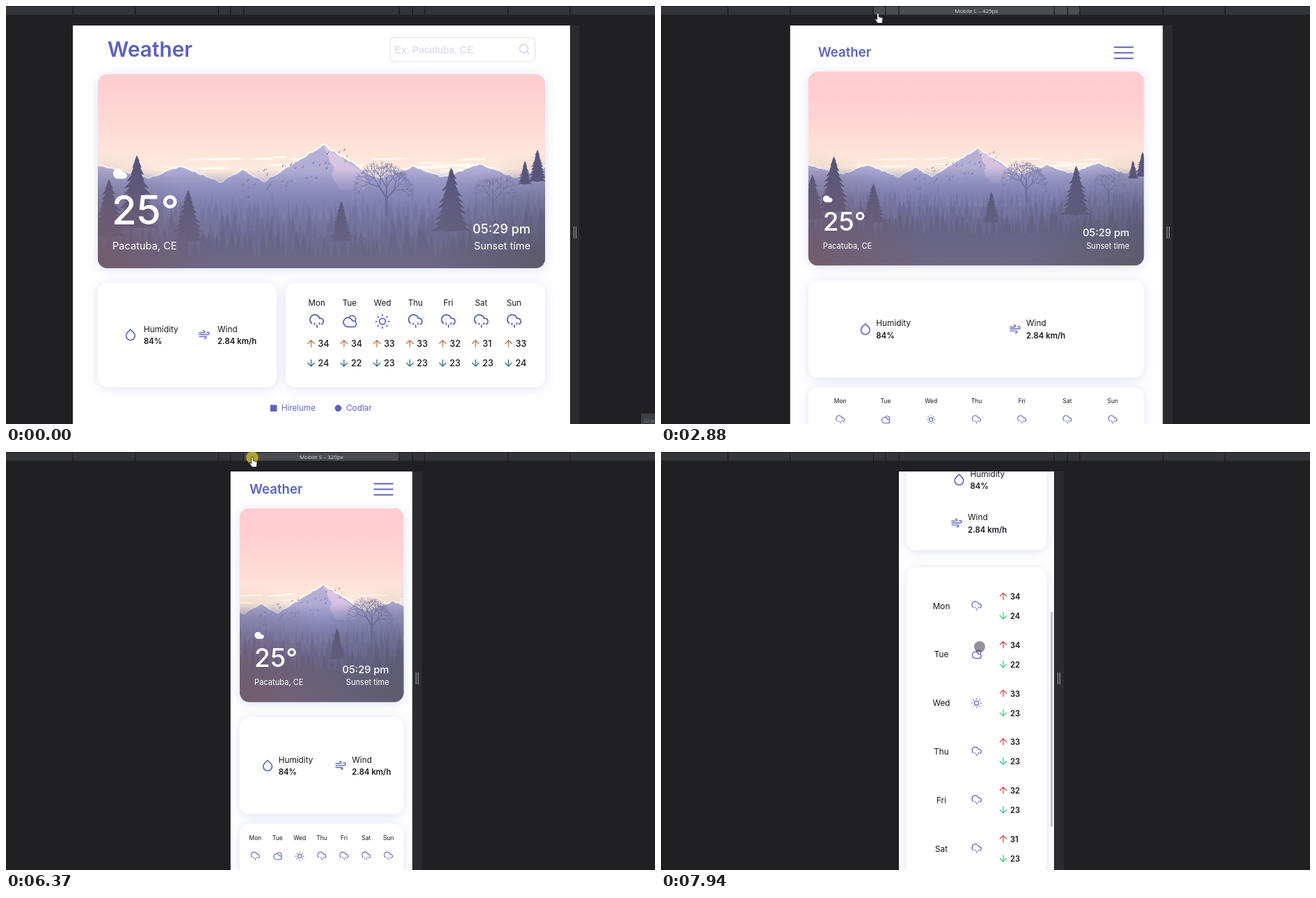
Write an HTML page with a canvas that moves like this. It is 933 px wide and 601 px high and loops after 8000 ms.

```html
<!DOCTYPE html>
<html lang="en">
<head>
<meta charset="utf-8">
<title>Weather layouts</title>
<style>
html, body { margin: 0; width: 100%; height: 100%; overflow: hidden; background: #202022; }
canvas { display: block; }
</style>
</head>
<body>
<canvas id="stage" width="933" height="601"></canvas>
<script>
const ctx = document.getElementById('stage').getContext('2d');
const LOOP = 8000, ZOOM = 0.698, MID = 453.5, TOP = 28;
const ACCENT = '#5c62be', INK = '#17171f', RED = '#d9534f', GREEN = '#4fc98a';
const DAYS = 'Mon Tue Wed Thu Fri Sat Sun'.split(' ');
const HIGHS = '34 34 33 33 32 31 33'.split(' ');
const LOWS = '24 22 23 23 23 23 24'.split(' ');
const skyIcon = i => ['rain', 'cloudSun', 'sun'][i] || 'rain';

const PATHS = {
  rain: 'M20 16.6A5 5 0 0 0 18 7h-1.26A8 8 0 1 0 4 15.25M8.5 15v2M12.5 18v3.5M16.5 14.5v2',
  cloudSun: 'M18 11h-1.26A7.6 7.6 0 1 0 9.5 21H18a5 5 0 0 0 0-10zM11.5 5.5A5.3 5.3 0 1 1 21.5 10.8',
  sun: 'M17 12a5 5 0 1 1-10 0 5 5 0 0 1 10 0',
  cloud: 'M18 10h-1.26A8 8 0 1 0 9 20h9a5 5 0 0 0 0-10z',
  drop: 'M12 2.7l5.66 5.66a8 8 0 1 1-11.32 0z',
  wind: 'M9.6 4.6A2 2 0 1 1 11 8H2m10.6 11.4A2 2 0 1 0 14 16H2m15.7-8.3A2.5 2.5 0 1 1 19.5 12H2',
  up: 'M12 19V5M5 12l7-7 7 7',
  down: 'M12 5v14M5 12l7 7 7-7',
  search: 'M19 11a8 8 0 1 1-16 0 8 8 0 0 1 16 0M21 21l-4.35-4.35',
  hand: 'M-1.3 1.2a1.3 1.3 0 0 1 2.6 0V5.6l4.4 1q1.5.4 1.3 2L6.3 14.8H-.2L-3.9 9.8q-.6-1.7 1-1.4l1.6 1.2z',
  arrow: 'M0 0V12L2.8 9.4 4.6 13.4 6.3 12.6 4.5 8.8H8.2z'
};
for (const key in PATHS) PATHS[key] = new Path2D(PATHS[key]);
for (let i = 0; i < 8; i++) {
  const c = Math.cos(i * Math.PI / 4), s = Math.sin(i * Math.PI / 4);
  PATHS.sun.moveTo(12 + 9.4 * c, 12 + 9.4 * s);
  PATHS.sun.lineTo(12 + 11 * c, 12 + 11 * s);
}

const clamp = v => Math.max(0, Math.min(1, v));
const easeOut = p => 1 - (1 - p) ** 2;

function text(str, x, y, size, color = INK, weight = 400, align = 'left', family = 'Inter') {
  ctx.font = `${weight} ${size}px "${family}", sans-serif`;
  ctx.fillStyle = color;
  ctx.textAlign = align;
  ctx.fillText(str, x, y);
}

function icon(name, cx, cy, size, color = ACCENT, fill = false) {
  ctx.save();
  ctx.translate(cx, cy);
  ctx.scale(size / 24, size / 24);
  ctx.translate(-12, -12);
  ctx.lineWidth = 2;
  ctx.lineCap = ctx.lineJoin = 'round';
  ctx.strokeStyle = ctx.fillStyle = color;
  fill ? ctx.fill(PATHS[name]) : ctx.stroke(PATHS[name]);
  ctx.restore();
}

function roundRect(x, y, w, h, r) {
  ctx.beginPath();
  ctx.roundRect(x, y, w, h, r);
}

function disc(x, y, r, color) {
  ctx.fillStyle = color;
  ctx.beginPath();
  ctx.arc(x, y, r, 0, 7);
  ctx.fill();
}

function card(x, y, w, h) {
  ctx.save();
  ctx.shadowColor = 'rgba(92,98,200,.2)';
  ctx.shadowBlur = 16;
  ctx.shadowOffsetY = 2;
  ctx.fillStyle = '#fff';
  roundRect(x, y, w, h, 14);
  ctx.fill();
  ctx.restore();
}

// Landscape, painted once
const SCENE_W = 643, SCENE_H = 362;
const scene = paintScene();

function paintScene() {
  const cv = document.createElement('canvas');
  cv.width = SCENE_W * 2;
  cv.height = SCENE_H * 2;
  const g = cv.getContext('2d');
  g.scale(2, 2);
  let seed = 11;
  const rand = (a = 0, b = 1) => a + (b - a) * ((seed = (seed * 16807) % 2147483647) / 2147483647);

  const fade = (y0, y1, ...colors) => {
    const grad = g.createLinearGradient(0, y0, 0, y1);
    colors.forEach((c, i) => grad.addColorStop(i / (colors.length - 1), c));
    return grad;
  };
  const band = (y0, y1, ...colors) => {
    g.fillStyle = fade(y0, y1, ...colors);
    g.fillRect(0, y0, SCENE_W, SCENE_H);
  };
  const pine = (x, y, h, w, color) => {
    const tiers = 11;
    g.fillStyle = color;
    for (const side of [-1, 1]) {
      g.beginPath();
      g.moveTo(x, y);
      for (let i = 1; i <= tiers; i++) {
        const reach = side * w / 2 * (i / tiers) ** 0.85, ty = y + h * i / tiers;
        g.lineTo(x + reach * rand(0.8, 1.15), ty);
        g.lineTo(x + reach * 0.6, ty - h * 0.02);
      }
      g.lineTo(x, y + h);
      g.fill();
    }
  };
  const forest = (base, low, high, color) => {
    for (let x = -8; x < SCENE_W + 8; x += rand(3, 11)) {
      const h = rand(low, high) * (0.8 + 0.4 * Math.abs(x / SCENE_W - 0.5));
      pine(x, base - h, h + 8, h * 0.5, color);
    }
    band(base, base + 1, color, color);
  };
  const branch = (x, y, len, angle, width, depth) => {
    const nx = x + Math.cos(angle) * len, ny = y + Math.sin(angle) * len;
    g.lineWidth = width;
    g.beginPath();
    g.moveTo(x, y);
    g.lineTo(nx, ny);
    g.stroke();
    if (!depth) return;
    for (const turn of [-0.62, 0, 0.62]) {
      branch(nx, ny, len * rand(0.62, 0.82), angle + turn * rand(0.8, 1.4), Math.max(0.4, width * 0.55), depth - 1);
    }
  };

  band(0, 205, '#fecdd1', '#fecfd1', '#fed8d3', '#fee5d9', '#fff0e2');

  // thin clouds, denser near the horizon
  g.fillStyle = '#fffaf2';
  for (let i = 0; i < 34; i++) {
    const x = rand(110, 540), y = 184 - 28 * rand() ** 1.4, r = rand(10, 30);
    g.beginPath();
    g.ellipse(x, y, r, rand(0.8, 2), -0.02, 0, 7);
    g.fill();
  }

  // each peak: x, y, slope
  const peaks = [[-12, 170, 0.25], [118, 174, 0.4], [208, 179, 0.6], [324, 144, 0.62], [453, 175, 0.35], [548, 171, 0.38], [655, 170, 0.38]];
  const height = x => Math.min(...peaks.map(([px, py, k]) => py + k * Math.abs(x - px)));
  g.beginPath();
  for (let x = -4; x <= SCENE_W + 4; x += 4) g.lineTo(x, height(x) + rand(-1, 1.5));
  g.strokeStyle = '#fffaf2';
  g.lineWidth = 5;
  g.lineJoin = 'round';
  g.stroke();
  g.lineTo(SCENE_W + 4, SCENE_H);
  g.lineTo(-4, SCENE_H);
  g.fillStyle = fade(144, 235, '#bbb2d7', '#aeabd4', '#989dcb');
  g.fill();

  // lit side of the main peak
  g.beginPath();
  g.moveTo(324, 145);
  g.lineTo(384, 184);
  g.lineTo(384, 208);
  for (let y = 208; y > 150; y -= 8) g.lineTo(326 + (y - 145) * 0.3 + rand(-5, 5), y);
  g.fillStyle = fade(145, 208, '#e0cbe4', '#cbbade');
  g.fill();

  band(178, 232, 'rgba(134,139,192,0)', 'rgba(134,139,192,.6)', '#8488be');

  g.fillStyle = '#6f6a9c';
  for (let i = 0; i < 40; i++) {
    const p = rand(), s = rand(1.5, 3.2);
    const x = 205 + 155 * p, y = 205 - 42 * p + rand(-20, 20);
    g.beginPath();
    g.moveTo(x - s, y - s * 0.4);
    g.lineTo(x, y + s * 0.5);
    g.lineTo(x + s, y - s);
    g.lineTo(x + s * 0.3, y + s);
    g.fill();
  }

  forest(232, 8, 24, '#8085bb');
  forest(252, 12, 32, '#7479ae');
  g.strokeStyle = '#706d9f';
  branch(415, 245, 25, -1.57, 4, 5);
  branch(568, 245, 20, -1.57, 2, 4);
  forest(276, 14, 42, '#666a9e');
  for (const [x, y, h] of [[350, 224, 58], [130, 208, 74], [16, 192, 84], [56, 158, 105], [508, 176, 92], [632, 150, 46], [614, 166, 34]]) {
    pine(x, y, h, h * 0.62, '#57557c');
  }
  forest(302, 18, 46, '#595c85');
  return cv;
}

function landscape(x, y, w, h) {
  card(x, y, w, h);
  ctx.save();
  roundRect(x, y, w, h, 14);
  ctx.clip();
  const s = Math.max(w / SCENE_W, h / SCENE_H);
  ctx.drawImage(scene, x + (w - SCENE_W * s) / 2, y + (h - SCENE_H * s) / 2, SCENE_W * s, SCENE_H * s);
  const wash = (grad, rgb, alpha) => {
    grad.addColorStop(0, `rgba(${rgb},${alpha})`);
    grad.addColorStop(1, `rgba(${rgb},0)`);
    ctx.fillStyle = grad;
    ctx.fillRect(x, y, w, h);
  };
  const corner = cx => ctx.createRadialGradient(cx, y + h, 0, cx, y + h, h * 0.6);
  wash(ctx.createLinearGradient(0, y + h, 0, y + h * 0.5), '116,108,132', 0.75);
  wash(corner(x), '118,86,92', 0.6);
  wash(corner(x + w), '84,82,94', 0.6);
  ctx.restore();
}

function fact(name, label, value, x, y, textX) {
  icon(name, x, y, name === 'drop' ? 19 : 17);
  text(label, textX, y - 4, 11.8);
  text(value, textX, y + 13.5, 11.4, INK, 600);
}
const humidity = (x, y, gap) => fact('drop', 'Humidity', '84%', x, y, x + gap);
const wind = (x, y, gap) => fact('wind', 'Wind', '2.84 km/h', x, y, x + gap);

function temps(i, x, y, upColor, downColor, weight, size) {
  icon('up', x, y, 16, upColor);
  text(HIGHS[i], x + 10, y + 4.7, size, INK, weight);
  icon('down', x, y + 28, 16, downColor);
  text(LOWS[i], x + 10, y + 32.7, size, INK, weight);
}

function menu(right, y, w) {
  ctx.fillStyle = ACCENT;
  for (const dy of [-8, 0, 8]) ctx.fillRect(right - w, y + dy - 1, w, 2);
}

function desktop() {
  text('Weather', 50, 73, 29.8, ACCENT, 600);
  ctx.strokeStyle = '#dfe0f5';
  ctx.lineWidth = 1.2;
  roundRect(456.5, 45.5, 208, 34.5, 6);
  ctx.stroke();
  text('Ex: Pacatuba, CE', 463, 68, 14.4, '#d4d5e9', 400, 'left', 'Liberation Sans');
  icon('search', 649, 62, 18, '#d0d1ed');

  landscape(36, 98, 643, 279);
  icon('cloud', 68, 241, 22, '#fff', true);
  text('25°', 56, 314, 58, '#fff', 500);
  text('Pacatuba, CE', 57, 350, 14.6, '#fff');
  text('05:29 pm', 658, 327, 18.2, '#fff', 500, 'right');
  text('Sunset time', 658, 350, 14.6, '#fff', 400, 'right');

  card(36, 398, 257, 150);
  humidity(83, 472.5, 19);
  wind(189, 472.5, 19);
  card(306, 398, 373, 150);
  DAYS.forEach((day, i) => {
    const x = 350.6 + i * 47.3;
    text(day, x, 431.3, 11.6, INK, 400, 'center');
    icon(skyIcon(i), x, 453.5, 21);
    temps(i, x - 8, 485.3, '#c8744d', '#3c7281', 500, 12.6);
  });
  ctx.fillStyle = ACCENT;
  ctx.fillRect(284, 573.5, 9.5, 9.5);
  text('Hirelume', 300, 582, 11.6, ACCENT);
  disc(381.5, 578.3, 4.8, ACCENT);
  text('Codlar', 393, 582, 11.8, ACCENT);
}

function stacked(w) {
  const m = w * 0.05, cw = w - 2 * m, top = 67.5 + m, right = m + cw;
  text('Weather', m + 14, top - 21, 18.6, ACCENT, 600);
  menu(w - m - 15, top - 27, 28);

  landscape(m, top, cw, 279);
  icon('cloud', m + 28, top + 183, 14.5, '#fff', true);
  text('25°', m + 21, top + 228.5, 37, '#fff', 500);
  text('Pacatuba, CE', m + 21, top + 254.5, 11.1, '#fff');
  text('05:29 pm', right - 21, top + 237, 14.7, '#fff', 500, 'right');
  text('Sunset time', right - 21, top + 254.5, 11.1, '#fff', 400, 'right');

  card(m, top + 300.5, cw, 139.5);
  humidity(m + cw * 0.17, top + 370, 15.5);
  wind(m + cw * 0.616, top + 370, 16);
  card(m, top + 454, cw, 160);
  DAYS.forEach((day, i) => {
    const x = m + cw * (0.095 + i * 0.1353);
    text(day, x, top + 477, 8.5, INK, 400, 'center');
    icon(skyIcon(i), x, top + 500.5, 13);
    temps(i, x - 7, top + 528, RED, GREEN, 500, 9);
  });
}

function narrow(w, scroll) {
  const c = w / 2;
  ctx.save();
  ctx.translate(0, -scroll);
  text('Weather', 25, 56.5, 18.6, ACCENT, 600);
  menu(193.5, 49, 21.5);
  landscape(11.2, 78, 201, 279.5);
  icon('cloud', c, 131.5, 22, '#fff', true);
  text('25°', c, 195.5, 50, '#fff', 500, 'center');
  text('Pacatuba, CE', c, 228, 11.1, '#fff', 400, 'center');
  text('05:29 pm', c, 293, 17.5, '#fff', 500, 'center');
  text('Sunset time', c, 311, 11.1, '#fff', 400, 'center');

  card(11.2, 378, 201, 140);
  humidity(86.5, 416.5, 16);
  wind(83, 479, 16);
  card(11.2, 543, 201, 529);
  DAYS.forEach((day, i) => {
    const y = 598.3 + i * 69.8;
    text(day, 61, y + 4.2, 11.8, INK, 400, 'center');
    icon(skyIcon(i), c, y, 14.5);
    temps(i, 150, y - 14, RED, GREEN, 600, 11.2);
  });
  ctx.restore();
  ctx.fillStyle = '#b9b9bd';
  roundRect(218.3, 32 + scroll * 0.525, 2.6, 309, 1.3);
  ctx.fill();
}

// A click resizes the preview first, then its content reflows
const RESIZE = 70;
const VIEWS = [
  { click: -LOOP, reflow: 130, css: 1024, label: 'Laptop', draw: desktop },
  { click: 2150, reflow: 210, css: 768, label: 'Tablet', draw: stacked },
  { click: 3290, reflow: 125, css: 425, label: 'Mobile L', draw: stacked },
  { click: 5260, reflow: 130, css: 375, label: 'Mobile M', draw: stacked },
  { click: 6370, reflow: 130, css: 320, label: 'Mobile S', draw: narrow }
];

// Pointer strokes: start, end, and the point reached
const MOVES = [
  [210, 1000, 448, 28], [1070, 1750, 212, 5], [2360, 2880, 312, 10],
  [3980, 4470, 333, 6], [5400, 5970, 354, 7], [6500, 6900, 458, 280]
];

function pointer(t) {
  if (t < MOVES[0][0]) return null;
  const held = Math.floor(t / 65) * 65;
  let x = 930, y = 600;
  for (const [start, end, tx, ty] of MOVES) {
    const p = easeOut(clamp((held - start) / (end - start)));
    x += (tx - x) * p;
    y += (ty - y) * p;
  }
  return { x, y };
}

// Two flicks, redrawn every 70 ms
function scrollAt(t) {
  const flick = (start, frames) => easeOut(clamp((Math.floor((t - start) / 70) + 1) / frames));
  return 280 * flick(7190, 5) + 97 * flick(7870, 2);
}

function ruler(cursor) {
  const bar = (x, w, color) => {
    ctx.fillStyle = color;
    ctx.fillRect(x, 1, w, 11.5);
  };
  bar(0, 933, '#343539');
  const reach = cursor && cursor.y < 12.5 ? Math.abs(cursor.x - MID) : Infinity;
  const hover = VIEWS.filter(v => reach <= v.css * ZOOM / 2).pop();
  if (hover) bar(MID - hover.css * ZOOM / 2, hover.css * ZOOM, '#4b4c4f');
  for (const v of VIEWS) {
    for (const side of [-1, 1]) bar(MID + side * v.css * ZOOM / 2 - 0.5, 1.3, '#1c1c1e');
  }
  if (hover) text(`${hover.label} – ${hover.css}px`, MID, 10.3, 8, '#dcdcde', 400, 'center', 'Open Sans');
}

function preview(t) {
  const view = VIEWS.filter(v => t >= v.click + RESIZE).pop();
  const shown = VIEWS.filter(v => t >= v.click + v.reflow).pop();
  const w = view.css * ZOOM, x = MID - w / 2;
  ctx.fillStyle = '#2a2b2e';
  ctx.fillRect(x + w, TOP, 14, 573);
  ctx.fillStyle = '#a3a3a5';
  for (const dx of [5, 8]) ctx.fillRect(Math.round(x + w) + dx, 317, 1, 17);
  ctx.save();
  ctx.beginPath();
  ctx.rect(x, TOP, w, 573);
  ctx.clip();
  ctx.fillStyle = '#fff';
  ctx.fillRect(x, TOP, w, 573);
  ctx.translate(Math.round(x), 0);
  shown.draw(shown.css * ZOOM, scrollAt(t));
  ctx.restore();
  return { x, w };
}

function drawPointer(p, page, t) {
  if (VIEWS.some(v => t >= v.click && t < v.click + RESIZE)) disc(p.x, p.y + 1, 8.8, '#b3a428');
  if (p.y > TOP && p.x > page.x && p.x < page.x + page.w) {
    disc(p.x, p.y, 8, 'rgba(45,35,50,.5)');
    return;
  }
  const shape = p.y < 13 ? PATHS.hand : PATHS.arrow;
  ctx.save();
  ctx.translate(p.x, p.y);
  ctx.fillStyle = '#fff';
  ctx.strokeStyle = '#1a1a1c';
  ctx.lineWidth = 0.9;
  ctx.fill(shape);
  ctx.stroke(shape);
  ctx.restore();
}

function render(t) {
  ctx.fillStyle = '#202022';
  ctx.fillRect(0, 0, 933, 601);
  const p = pointer(t);
  ruler(p);
  const page = preview(t);
  if (t < 70) {
    ctx.fillStyle = '#3d3f47';
    ctx.fillRect(913, 586, 20, 15);
    text('Grav', 917, 599, 8, '#77798a', 400, 'left', 'Open Sans');
  }
  if (p) drawPointer(p, page, t);
}

const start = performance.now();
function tick() {
  render((performance.now() - start) % LOOP);
  requestAnimationFrame(tick);
}
tick();
</script>
</body>
</html>
```
